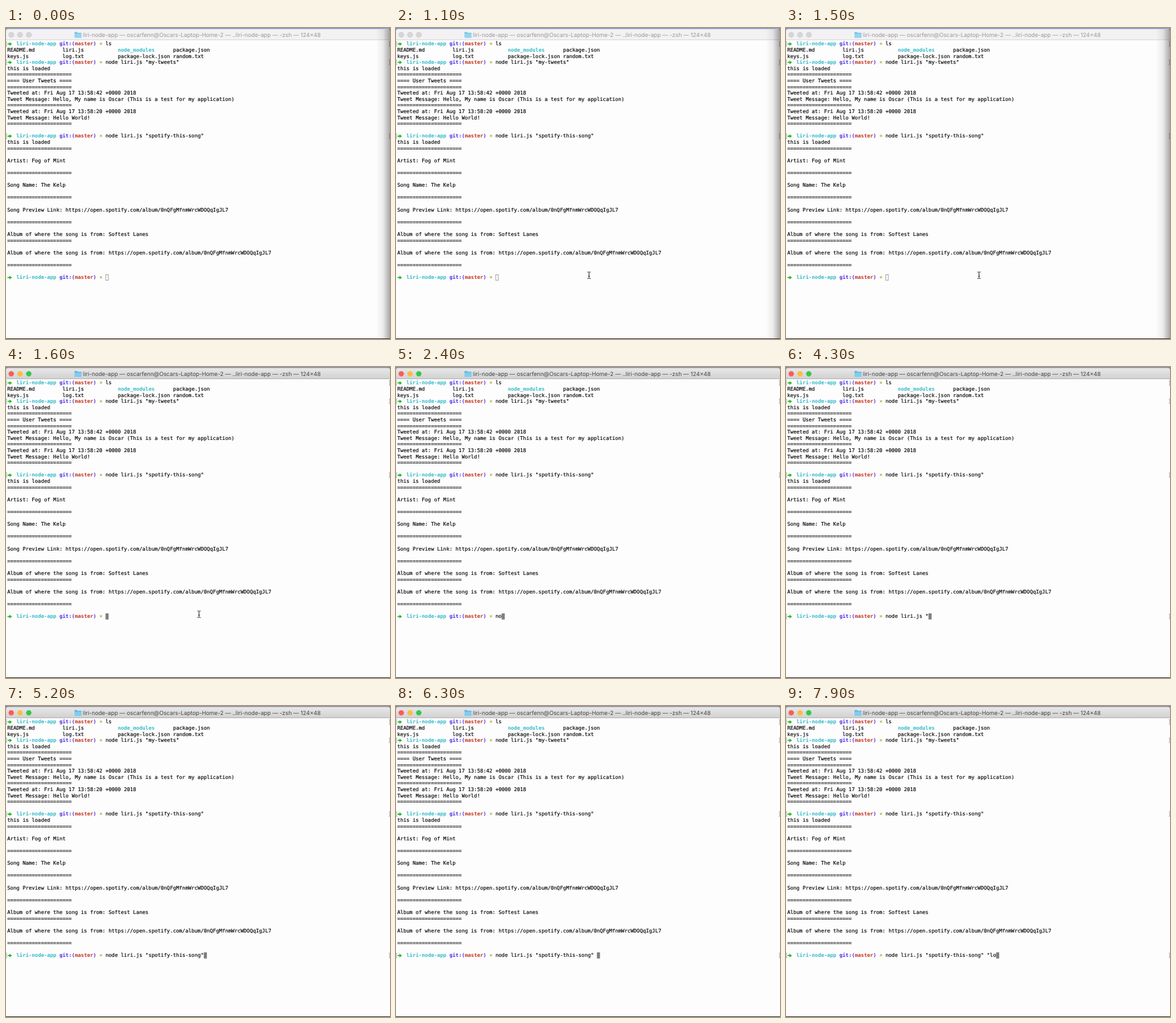
Animation of 600x486 px, one loop 8000 ms. Source, as an HTML page:

```html
<!DOCTYPE html>
<html lang="en">
<head>
<meta charset="utf-8">
<title>Terminal</title>
<style>
  html, body { margin: 0; width: 100%; height: 100%; overflow: hidden; background: #fefdfe; }
  svg { display: block; width: 600px; height: 486px; }
  text { white-space: pre; text-rendering: geometricPrecision; }
  #rows { font: 7.97px "DejaVu Sans Mono", monospace; fill: #000; }
  .plain { stroke: #000; stroke-width: .15; }
  .b { font-weight: bold; }
  #title { font: 8.85px Inter, "Open Sans", sans-serif; }
  .cyan { fill: #33bbc8; }
  .blue { fill: #492ee1; }
  .red { fill: #c23621; }
  .olive { fill: #adad27; }
</style>
</head>
<body>
<svg id="stage" viewBox="0 0 600 486" xmlns="http://www.w3.org/2000/svg">
  <defs>
    <linearGradient id="lit" x2="0" y2="1">
      <stop stop-color="#e9e8e9"/><stop offset="1" stop-color="#d1d0d1"/>
    </linearGradient>
    <linearGradient id="shade">
      <stop stop-color="#000" stop-opacity="0"/>
      <stop offset=".5" stop-color="#000" stop-opacity=".07"/>
      <stop offset="1" stop-color="#000" stop-opacity=".34"/>
    </linearGradient>
  </defs>
  <rect width="600" height="486" fill="#fefdfe"/>
  <rect id="desk" width="600" height="6"/>
  <path id="bar" d="M0 19V5Q0 1.5 3.5 1.5H596.5Q600 1.5 600 5V19Z"/>
  <rect id="rule" y="18.2" width="600" height=".8"/>
  <g id="lights"></g>
  <g id="folder">
    <path d="M107 7.2q0-.9 .9-.9h3l1 1.2h5.2q.9 0 .9 .9v6q0 .8-.9 .8h-9.2q-.9 0-.9-.8z" fill="#5fb8e2"/>
    <path d="M107 9h11v5.4q0 .8-.9 .8h-9.2q-.9 0-.9-.8z" fill="#7fcdf0"/>
  </g>
  <text id="title" x="120" y="13.5">liri-node-app — oscarfenn@Oscars-Laptop-Home-2 — ..liri-node-app — -zsh — 124×48</text>
  <g id="rows"></g>
  <rect id="caret"/>
  <rect id="shadow" x="578" y="2" width="22" height="484" fill="url(#shade)"/>
  <rect y="485" width="600" height="1" fill="#35322f"/>
  <path id="mouse" fill="none" stroke="#222" d="M-2.4-5.3Q-.3-5.3 0-4.2Q.3-5.3 2.4-5.3M0-4.2V4.2M-2.4 5.3Q-.3 5.3 0 4.2Q.3 5.3 2.4 5.3M-1.2 1.6H1.2"/>
</svg>
<script>
const LOOP = 8000, CELL = 4.8, PITCH = 9.605, LEFT = 1.9, TOP = 20, CMD = 32, LAST = 38;
const $ = id => document.getElementById(id);
const set = (el, attrs) => { for (const k in attrs) el.setAttribute(k, attrs[k]); };
const show = (el, on) => set(el, { visibility: on ? "visible" : "hidden" });

function add(parent, tag, attrs, text = "") {
  const el = document.createElementNS("http://www.w3.org/2000/svg", tag);
  set(el, attrs);
  el.textContent = text;
  parent.append(el);
  return el;
}

const colX = col => LEFT + col * CELL;
const rowY = row => TOP + row * PITCH;
const put = (row, col, text, cls = "plain") =>
  add($("rows"), "text", { x: colX(col), y: rowY(row) + 7.3, class: cls }, text);

function marks(row) {
  const y = rowY(row) + 1.2;
  return add($("rows"), "path", {
    d: `M1.8 ${y}H.4v7.2H1.8M598.2 ${y}h1.4v7.2h-1.4`,
    fill: "none", stroke: "#999", "stroke-width": .8
  });
}

function prompt(row, cmd) {
  const y = rowY(row) + 4.9;
  add($("rows"), "path", {
    d: `M2.4 ${y - .9}H5.4V${y - 3}L9.4 ${y}L5.4 ${y + 3}V${y + .9}H2.4Z`, fill: "#25bc24"
  });
  put(row, 3, "liri-node-app", "b cyan");
  put(row, 17, "git:(", "b blue");
  put(row, 22, "master", "b red");
  put(row, 28, ")", "b blue");
  put(row, 30, "×", "b olive");
  return put(row, CMD, cmd);
}

const LINE = "=".repeat(21);
const LINK = "https://open.spotify.com/album/0nQFgMfnmWrcWDOQqIgJL7";
const output = {
  4: ["this is loaded", LINE, "==== User Tweets ====", LINE,
    "Tweeted at: Fri Aug 17 13:58:42 +0000 2018",
    "Tweet Message: Hello, My name is Oscar (This is a test for my application)",
    LINE,
    "Tweeted at: Fri Aug 17 13:58:20 +0000 2018",
    "Tweet Message: Hello World!", LINE],
  16: ["this is loaded", LINE, "", "Artist: Fog of Mint", "", LINE, "",
    "Song Name: The Kelp", "", LINE, "", "Song Preview Link: " + LINK, "", LINE, "",
    "Album of where the song is from: Softest Lanes", LINE, "",
    "Album of where the song is from: " + LINK, "", LINE]
};
for (const start in output)
  output[start].forEach((s, i) => s && put(+start + i, 0, s));

[["README.md", "liri.js", "node_modules", "package.json"],
 ["keys.js", "log.txt", "package-lock.json", "random.txt"]].forEach((names, r) =>
  names.forEach((s, c) => put(r + 1, c * 18, s, s === "node_modules" ? "b cyan" : "plain")));

prompt(0, "ls");
prompt(3, 'node liri.js "my-tweets"');
prompt(15, 'node liri.js "spotify-this-song"');
[0, 3, 15].forEach(marks);
const typed = prompt(LAST, ""), lastMarks = marks(LAST);

const lamps = ["#fc5b57", "#fdbc40", "#34c84a"];
lamps.forEach((c, i) => add($("lights"), "circle", { cx: 8.2 + i * 13.7, cy: 10.6, r: 4.2, "stroke-width": .5 }));

// [time, characters typed so far]
const command = 'node liri.js "spotify-this-song" "lo';
const keys = [[2200, 1], [2400, 2], [2500, 3], [2600, 4], [2700, 6], [2900, 7], [3000, 8], [3200, 9],
  [3800, 10], [3900, 11], [4000, 12], [4100, 13], [4300, 14]];
for (let i = 1; i <= 9; i++) keys.push([4300 + i * 100, 14 + i * 2]);
keys.push([6200, 33], [6600, 34], [7700, 35], [7900, 36]);

function draw(t) {
  const active = t >= 1600;
  set($("desk"), { fill: active ? "#868c9c" : "#7f97bb" });
  set($("bar"), { fill: active ? "url(#lit)" : "#f3f1f3" });
  set($("rule"), { fill: active ? "#b0afb0" : "#d4d4d4" });
  set($("title"), { fill: active ? "#444" : "#999" });
  set($("folder"), { opacity: active ? 1 : .8 });
  [...$("lights").children].forEach((el, i) =>
    set(el, { fill: active ? lamps[i] : "#d6d6d6", stroke: active ? "none" : "#c4c4c4" }));
  show($("shadow"), !active);

  let n = 0;
  for (const [at, count] of keys) if (t >= at) n = count;
  typed.textContent = command.slice(0, n);
  const inset = active ? 0 : .4;
  set($("caret"), {
    x: colX(CMD + n) + inset, y: rowY(LAST) + inset,
    width: CELL - inset * 2, height: PITCH - inset * 2,
    fill: active ? "#7f7f7f" : "none", stroke: active ? "none" : "#8c8c8c", "stroke-width": .8
  });
  show(lastMarks, t >= 2900);

  show($("mouse"), t >= 600 && t < 2200);
  set($("mouse"), { transform: t < 700 ? "translate(373 480)" : "translate(301.6 386.4)" });
}

const begin = performance.now();
function tick() {
  draw((performance.now() - begin) % LOOP);
  requestAnimationFrame(tick);
}
tick();
</script>
</body>
</html>
```
